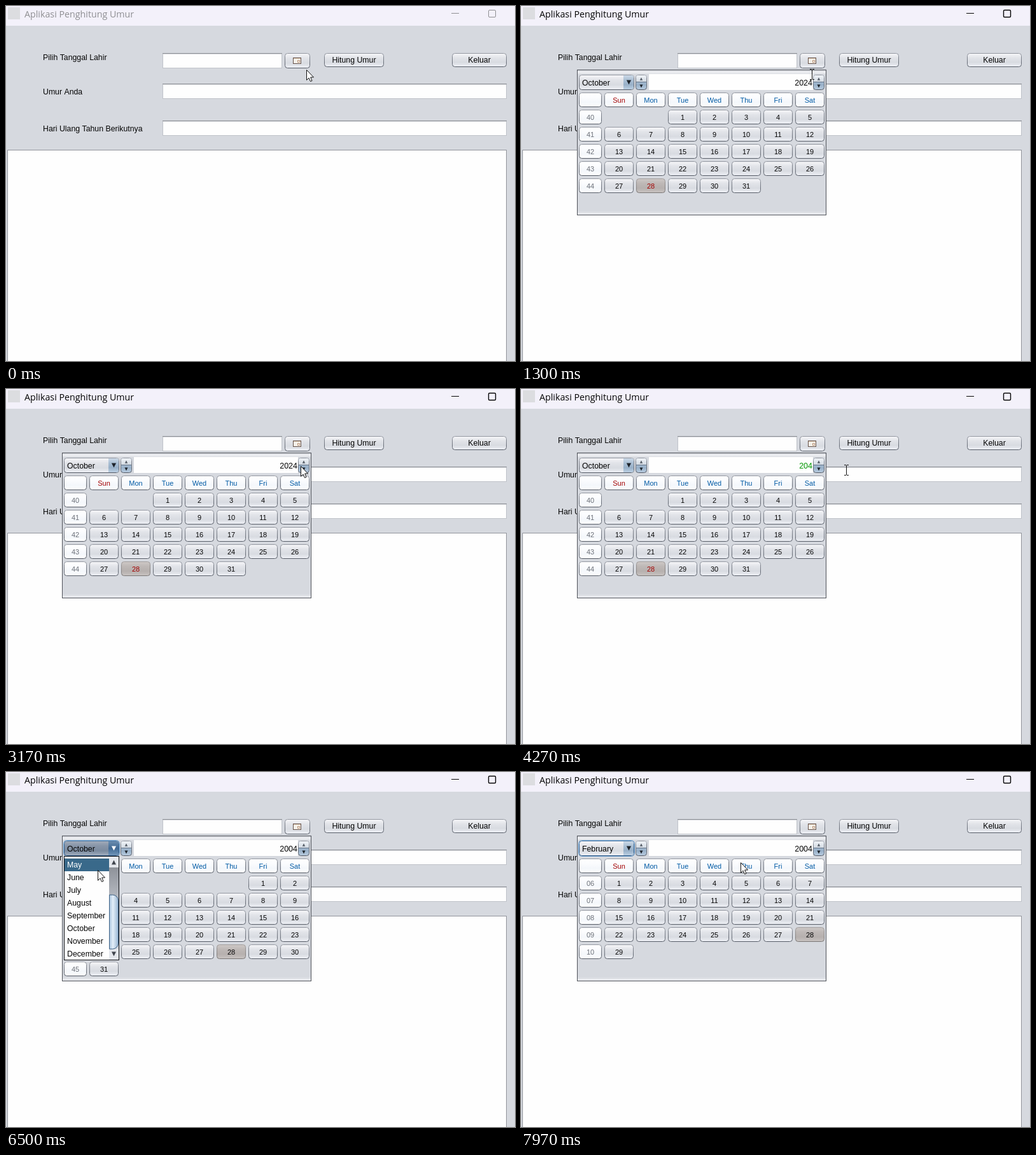
An HTML page with a canvas for the animation above (8 s loop, 800 by 558 pixels).

```html
<!DOCTYPE html>
<html lang="id">
<head>
<meta charset="utf-8">
<title>Aplikasi Penghitung Umur</title>
<style>
html, body { margin: 0; width: 100%; height: 100%; overflow: hidden; background: #d6d9df; }
canvas { display: block; }
</style>
</head>
<body>
<canvas id="stage" width="800" height="558"></canvas>
<script>
const ctx = document.getElementById('stage').getContext('2d');
const LOOP = 8000;
const BG = '#d6d9df', PAPER = '#fefefe', INK = '#050505';
const MONTHS = ['January', 'February', 'March', 'April', 'May', 'June', 'July',
  'August', 'September', 'October', 'November', 'December'];
const DAYS = ['Sun', 'Mon', 'Tue', 'Wed', 'Thu', 'Fri', 'Sat'];
const SKIN = {
  button: ['#f8f8fa', '#e2e4e9', '#d8dbe1', '#f1f3f8'],
  hover: ['#ffffff', '#f7f8fa', '#eff1f5', '#ffffff'],
  header: ['#ffffff', '#fbfcfe', '#f4f7fb', '#ffffff'],
  selected: ['#cfcac8', '#beb8b6', '#b6b0ae', '#cac5c3'],
  blue: ['#cbd9e7', '#aabfd4', '#98b0c8', '#bcd0e4'],
  dark: ['#a3adbb', '#8795a8', '#7b8b9f', '#a4b1c1']
};
const TIMES = { active: 450, popup: 540, erase: 4200, insert: 4600, open: 6050, choose: 7540 };
const PATH = [[0, 472, 100], [150, 472, 100], [450, 461, 86], [950, 461, 86],
  [1550, 455, 120], [3050, 455, 120], [3550, 511, 127], [4700, 511, 127],
  [5350, 210, 83], [5650, 210, 83], [5950, 168, 120], [6150, 168, 120],
  [6450, 144, 154], [6900, 144, 154], [7200, 144, 166], [7560, 144, 166],
  [7930, 345, 142], [LOOP, 345, 142]];
const FIELDS = [[246, 74, 188, 24], [246, 122, 541, 24], [246, 180, 541, 24]];
const YEAR_BOX = [201, 107, 258, 25];

const inside = (p, [x, y, w, h]) => p.x >= x && p.x < x + w && p.y >= y && p.y < y + h;

function rect(x, y, w, h, color) {
  ctx.fillStyle = color;
  ctx.fillRect(x, y, w, h);
}

function frame(x, y, w, h, color) {
  ctx.strokeStyle = color;
  ctx.lineWidth = 1;
  ctx.strokeRect(x + .5, y + .5, w - 1, h - 1);
}

function text(str, x, y, { size = 12.3, color = INK, align = 'left', family = '"Liberation Sans", Arial, sans-serif' } = {}) {
  ctx.font = `${size}px ${family}`;
  ctx.fillStyle = color;
  ctx.textAlign = align;
  ctx.fillText(str, x, y);
}

function shade(y, h, colors) {
  const g = ctx.createLinearGradient(0, y, 0, y + h);
  colors.forEach((c, i) => g.addColorStop(i / (colors.length - 1), c));
  return g;
}

function polygon(points, fill, stroke) {
  ctx.beginPath();
  points.forEach(([x, y]) => ctx.lineTo(x, y));
  ctx.closePath();
  ctx.fillStyle = fill;
  ctx.fill();
  if (stroke) {
    ctx.strokeStyle = stroke;
    ctx.lineWidth = 1;
    ctx.stroke();
  }
}

function triangle(x, y, half, dir, color = '#1d2229') {
  polygon([[x - half, y - half * dir], [x + half, y - half * dir], [x, y + half * dir]], color);
}

function button(x, y, w, h, skin, label = '', size = 11, color = INK, border = ['#969aa3', '#555b66']) {
  ctx.beginPath();
  ctx.roundRect(x + .5, y + .5, w - 1, h - 1, 4);
  ctx.fillStyle = shade(y, h, SKIN[skin]);
  ctx.fill();
  ctx.strokeStyle = shade(y, h, border);
  ctx.lineWidth = 1;
  ctx.stroke();
  text(label, x + w / 2, y + Math.round(h / 2) + 4, { size, color, align: 'center' });
}

function field([x, y, w, h]) {
  rect(x, y, w, h, PAPER);
  frame(x, y, w, h, '#c0c3c9');
  rect(x, y, w, 1, '#8c8f95');
  rect(x + 1, y + 1, w - 2, 1, '#d6d8dc');
}

function spinner(x) {
  button(x, 108, 18, 24, 'blue');
  ctx.beginPath();
  ctx.roundRect(x + 1, 109, 16, 10, [3, 3, 0, 0]);
  ctx.fillStyle = shade(109, 10, ['#f0f3f7', '#d3dae3']);
  ctx.fill();
  rect(x + 1, 119, 16, 1, '#647488');
  triangle(x + 9, 114.5, 2.2, -1, '#555c66');
  triangle(x + 9, 126, 2.5, 1);
}

function drawWindow(active, pointer) {
  const ink = active ? INK : '#8f8f93';
  rect(0, 0, 800, 558, BG);
  rect(0, 0, 800, 31, '#f3f1fa');
  rect(3, 2, 19, 19, '#dcdde0');
  text('Aplikasi Penghitung Umur', 29, 18, { size: 14.25, color: ink, family: '"Open Sans", "Noto Sans", sans-serif' });
  rect(700, 11, 12, 1, ink);
  ctx.beginPath();
  ctx.roundRect(758.5, 6.5, 11, 11, 1.5);
  ctx.strokeStyle = ink;
  ctx.lineWidth = active ? 1.4 : 1;
  ctx.stroke();

  text('Pilih Tanggal Lahir', 58, 85);
  text('Umur Anda', 58, 139);
  text('Hari Ulang Tahun Berikutnya', 58, 197);
  FIELDS.forEach(field);

  button(438, 74, 40, 24, inside(pointer, [438, 74, 40, 24]) ? 'hover' : 'button');
  rect(451, 81, 13, 10, '#f4f1ea');
  frame(451, 81, 13, 10, '#66524a');
  rect(452, 82, 11, 1, '#d9c5ae');
  frame(458, 85, 4, 4, '#c09a80');
  button(500, 74, 94, 22, 'button', 'Hitung Umur', 12.3);
  button(701, 74, 86, 22, 'button', 'Keluar', 12.3);

  rect(2, 226, 785, 340, PAPER);
  frame(2, 226, 785, 340, '#92959c');
}

function drawCalendar(year, month) {
  const first = new Date(year, month, 1).getDay();
  const count = new Date(year, month + 1, 0).getDate();
  const dayOfYear = Math.round((Date.UTC(year, month, 1) - Date.UTC(year, 0, 1)) / 864e5) + 1;
  const week = Math.ceil((dayOfYear + new Date(year, 0, 1).getDay()) / 7);

  button(91, 136, 36, 23, 'header');
  DAYS.forEach((name, c) =>
    button(131 + 50 * c, 136, 46, 23, 'header', name, 11, c ? '#005aa4' : '#a40000'));
  for (let r = 0; r < Math.ceil((first + count) / 7); r++)
    button(91, 163 + 27 * r, 36, 23, 'header', String(week + r).padStart(2, '0'), 11, '#6c7078');
  for (let d = 1; d <= count; d++) {
    const i = first + d - 1, chosen = d === 28;
    button(131 + 50 * (i % 7), 163 + 27 * Math.floor(i / 7), 46, 23,
      chosen ? 'selected' : 'button', d, 11, chosen && year === 2024 ? '#a40000' : INK,
      chosen ? ['#a29e9d', '#797574'] : undefined);
  }
}

function drawCombo(month, open, focused) {
  const border = focused ? ['#4f7ba6', '#2c5480'] : undefined;
  button(91, 108, 87, 24, open ? 'dark' : 'button', '', 11, INK, border);
  ctx.beginPath();
  ctx.roundRect(161, 109, 16, 22, [0, 3, 3, 0]);
  ctx.fillStyle = shade(109, 22, open ? ['#6a8cae', '#416a94', '#6f94b8'] : SKIN.blue);
  ctx.fill();
  if (focused) {
    ctx.beginPath();
    ctx.roundRect(90.5, 107.5, 88, 25, 5);
    ctx.strokeStyle = '#73a4d1';
    ctx.stroke();
  }
  triangle(169.5, 120, 3.6, 1, open ? '#ffffff' : '#1d2229');
  text(MONTHS[month], 96, 125);
}

function drawList(top, selected) {
  rect(91, 132, 87, 164, PAPER);
  for (let r = 0; r < 8; r++) {
    const y = 136 + 20 * r, on = top + r === selected;
    if (on) rect(92, y, 70, 20, '#39698a');
    text(MONTHS[top + r], 96, y + 14, { color: on ? '#ffffff' : INK });
  }
  rect(162, 133, 15, 162, '#e4e7ec');
  ctx.fillStyle = shade(150, 128, ['#8e9299', '#c3c7cf', '#d3d7de']);
  ctx.fillRect(162, 150, 15, 128);
  const y = 150 + top / 12 * 128;
  const g = ctx.createLinearGradient(162, 0, 177, 0);
  g.addColorStop(0, '#a3bfda');
  g.addColorStop(.4, '#e4eff9');
  g.addColorStop(1, '#94b2d0');
  ctx.beginPath();
  ctx.roundRect(162.5, y + .5, 14, 85, [0, 9, 9, 0]);
  ctx.fillStyle = g;
  ctx.fill();
  ctx.strokeStyle = '#3d6185';
  ctx.stroke();
  triangle(169.5, 142, 3.5, -1, '#40454d');
  triangle(169.5, 286, 3.5, 1, '#40454d');
  frame(91, 132, 87, 164, '#0c0e12');
}

function drawPopup(t, pointer) {
  const open = t >= TIMES.open && t < TIMES.choose;
  const month = t >= TIMES.choose ? 1 : 9;
  const editing = t >= TIMES.erase && t < TIMES.open;
  const typed = t < TIMES.erase ? '2024' : t < TIMES.insert ? '204' : '2004';

  rect(88, 100, 392, 229, BG);
  rect(89, 101, 390, 6, shade(101, 6, ['#d0d3d9', '#f0f1f4', '#dcdfe4']));
  rect(89, 322, 390, 6, shade(322, 6, [BG, '#eceef1']));
  frame(88, 100, 392, 229, '#50535a');
  spinner(180);
  rect(...YEAR_BOX, PAPER);
  spinner(459);
  text(typed, 458, 125, { size: 12.5, color: editing ? '#009600' : INK, align: 'right' });
  drawCalendar(t < TIMES.open ? 2024 : 2004, month);
  drawCombo(month, open, t >= TIMES.open);
  if (open) {
    const top = t < 6700 ? 4 : t < 6850 ? 1 : 0;
    drawList(top, pointer.y < 136 ? month : top + Math.floor((pointer.y - 136) / 20));
  }
}

function pointerAt(t) {
  const i = PATH.findIndex(p => p[0] > t);
  const [t0, x0, y0] = PATH[i - 1], [t1, x1, y1] = PATH[i];
  const u = (t - t0) / (t1 - t0), e = u * u * (3 - 2 * u);
  return { x: Math.round(x0 + (x1 - x0) * e), y: Math.round(y0 + (y1 - y0) * e) };
}

function drawPointer(p, popup) {
  const overPopup = popup && inside(p, [88, 100, 392, 229]);
  const beam = overPopup ? inside(p, YEAR_BOX) : FIELDS.some(f => inside(p, f));
  ctx.save();
  ctx.translate(p.x, p.y);
  if (beam) {
    rect(0, -7, 1, 15, '#111');
    for (const y of [-8, 8]) {
      rect(-3, y, 3, 1, '#111');
      rect(1, y, 3, 1, '#111');
    }
  } else {
    polygon([[.5, .5], [.5, 16.5], [4, 13], [6.5, 18.5], [9, 17.5], [6.7, 12], [11.5, 12]], '#ffffff', '#111');
  }
  ctx.restore();
}

function draw(now) {
  const t = now % LOOP;
  const pointer = pointerAt(t), popup = t >= TIMES.popup;
  drawWindow(t >= TIMES.active, pointer);
  if (popup) drawPopup(t, pointer);
  drawPointer(pointer, popup);
}

const start = performance.now();
function tick() {
  draw(performance.now() - start);
  requestAnimationFrame(tick);
}
tick();
</script>
</body>
</html>
```
